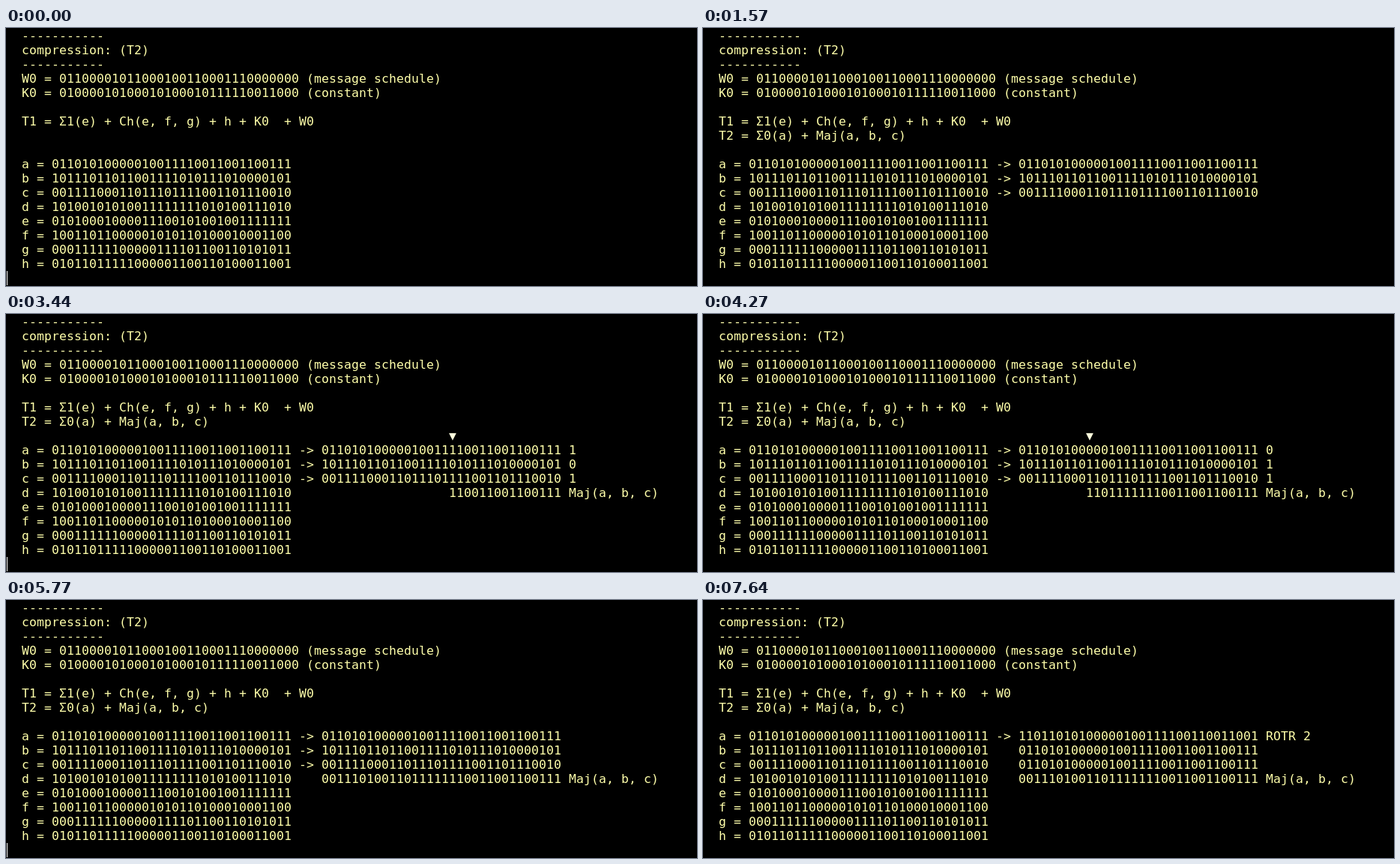
Write an HTML page with a canvas that moves like this. It is 922 px wide and 344 px high and loops after 8 s.

```html
<!DOCTYPE html>
<html lang="en">
<head>
<meta charset="utf-8">
<title>SHA-256 compression: T2</title>
<style>
  html, body { margin: 0; width: 100%; height: 100%; overflow: hidden; background: #000; }
  canvas { display: block; }
</style>
</head>
<body>
<canvas id="screen" width="922" height="344"></canvas>
<script>
const LOOP = 8000, CELL_W = 10, CELL_H = 19, ORIGIN = 1, ASCENT = 16;
const BITS_COL = 42, NOTE_COL = 75, FIRST_ROW = 9, RESULT_ROW = 12;

const registers = {
  a: '01101010000010011110011001100111',
  b: '10111011011001111010111010000101',
  c: '00111100011011101111001101110010',
  d: '10100101010011111111010100111010',
  e: '01010001000011100101001001111111',
  f: '10011011000001010110100010001100',
  g: '00011111100000111101100110101011',
  h: '01011011111000001100110100011001',
};
const { a, b, c } = registers;
const inputs = [a, b, c];
const majority = [...a].map((bit, i) => +bit + +b[i] + +c[i] > 1 ? 1 : 0).join('');
const rotr = (word, n) => word.slice(32 - n) + word.slice(0, 32 - n);

const ctx = document.getElementById('screen').getContext('2d');

function print(col, row, text, color = '#ffffaa') {
  ctx.fillStyle = color;
  [...text].forEach((char, i) =>
    ctx.fillText(char, ORIGIN + (col + i) * CELL_W, ASCENT + row * CELL_H));
}

function printHeader() {
  [
    '-----------',
    'compression: (T2)',
    '-----------',
    'W0 = 01100001011000100110001110000000 (message schedule)',
    'K0 = 01000010100010100010111110011000 (constant)',
    '',
    'T1 = Σ1(e) + Ch(e, f, g) + h + K0  + W0',
  ].forEach((line, row) => print(2, row, line));
  Object.entries(registers).forEach(([name, word], i) =>
    print(2, FIRST_ROW + i, `${name} = ${word}`));
}

// Time at which the nth majority bit is revealed: a steady tick with a small lag every nine.
const tickTime = n =>
  1970 + 100 * (n - 1) + 30 * Math.floor((n + 5) / 9) + (n > 12 ? 10 : 0);

function printMajority(t) {
  inputs.forEach((word, i) => {
    print(39, FIRST_ROW + i, '->');
    if (t >= 1570) print(BITS_COL, FIRST_ROW + i, word);
  });
}

function printMajorityBits(t) {
  let count = 0;
  while (count < 32 && t >= tickTime(count + 1)) count++;
  if (!count) return;
  const index = 32 - count;
  print(BITS_COL + index, RESULT_ROW, majority.slice(index));
  print(NOTE_COL, RESULT_ROW, 'Maj(a, b, c)');
  if (t >= 5700) return;
  print(BITS_COL + index, FIRST_ROW - 1, '▼', '#ffffdd');
  inputs.forEach((word, i) => print(NOTE_COL, FIRST_ROW + i, word[index]));
}

function printRotation(t) {
  const turns = t >= 7640 ? 2 : t >= 7500 ? 1 : 0;
  print(39, FIRST_ROW, '->');
  if (t >= 6700) print(BITS_COL, FIRST_ROW, rotr(a, turns));
  if (t >= 6900) print(BITS_COL, FIRST_ROW + 1, a);
  if (t >= 7100) print(BITS_COL, FIRST_ROW + 2, a);
  if (turns) print(NOTE_COL, FIRST_ROW, `ROTR ${turns}`);
}

function draw(t) {
  ctx.fillStyle = '#000';
  ctx.fillRect(0, 0, 922, 344);
  ctx.font = '16.4px "DejaVu Sans Mono", monospace';
  printHeader();
  if (t >= 400) print(2, 7, 'T2 =');
  if (t >= 770) print(7, 7, 'Σ0(a) + Maj(a, b, c)');
  if (t >= 1170 && t < 6100) printMajority(t);
  printMajorityBits(t);
  if (t >= 6500) printRotation(t);

  const cursorOn = Math.floor((t - 370) / 600) & 1;
  if (cursorOn) {
    ctx.fillStyle = '#fff';
    ctx.fillRect(1, 324, 1, CELL_H);
  }
}

function frame() {
  draw(performance.now() % LOOP);
  requestAnimationFrame(frame);
}
frame();
</script>
</body>
</html>
```
